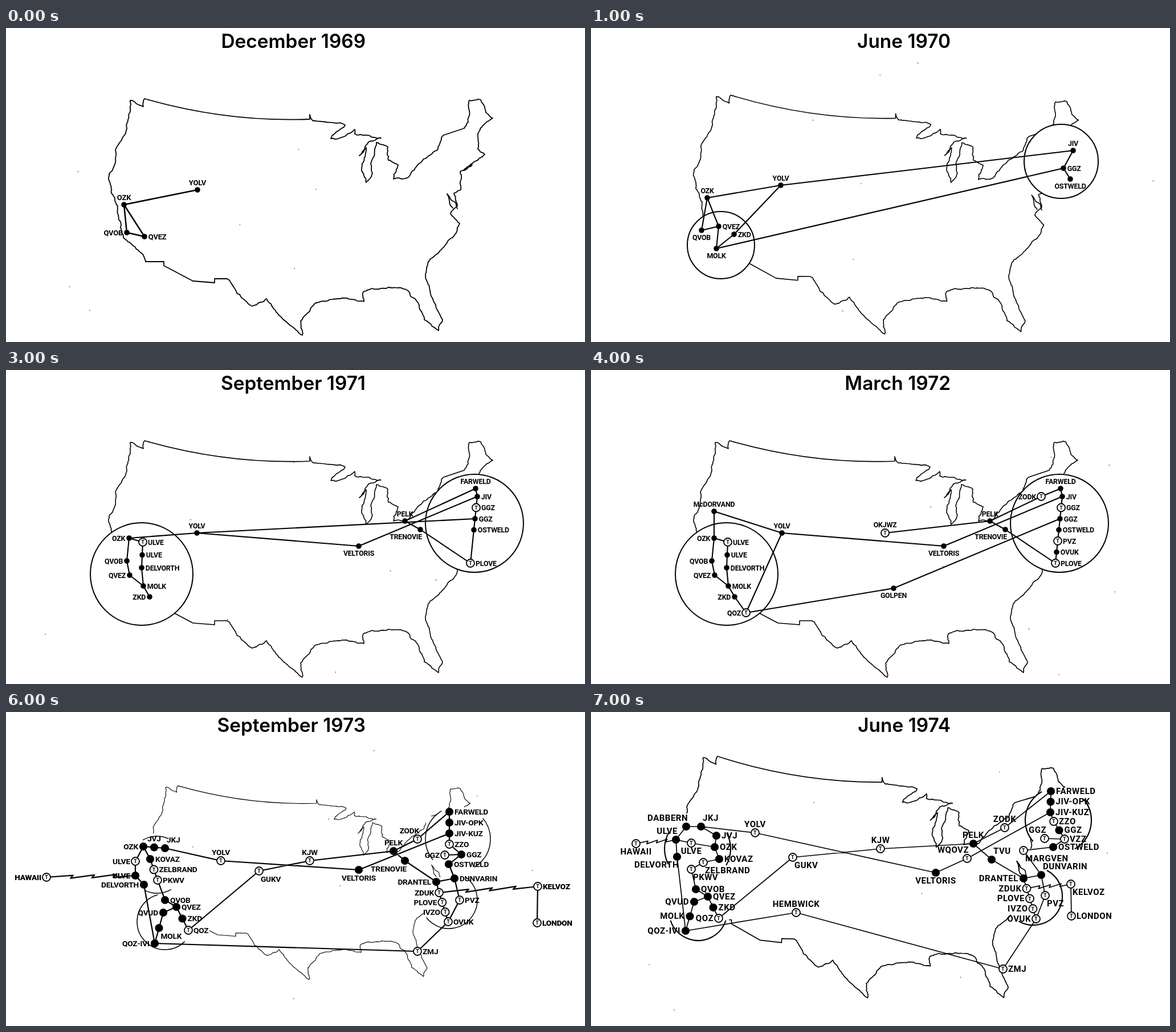
An HTML page for the animation above (8000 ms loop, 1016 by 551 pixels).

```html
<!DOCTYPE html>
<html lang="en">
<head>
<meta charset="utf-8">
<title>Network map</title>
<style>
  html, body { margin: 0; width: 100%; height: 100%; overflow: hidden; background: #fff; }
  svg { display: block; width: 1016px; height: 551px; }
  path, circle { fill: none; stroke: #000; stroke-linecap: round; stroke-linejoin: round; }
  .map path { vector-effect: non-scaling-stroke; }
  .hole { fill: #fff; stroke: none; }
  .dot { fill: #000; stroke: none; }
  .ring { fill: #fff; stroke-width: 1.8; }
  .arc { stroke-linecap: butt; }
  text { font-family: Roboto, Lato, sans-serif; }
  .title { font: 600 33.4px Inter, sans-serif; text-anchor: end; }
  .t { font: 700 9px Roboto, sans-serif; text-anchor: middle; }
</style>
</head>
<body>
<svg id="stage" viewBox="0 0 1016 551"></svg>
<script>
let seed = 7;
const random = () => (seed = seed * 16807 % 2147483647) / 2147483647;
const spread = amp => (random() * 2 - 1) * amp;

// Fractal shoreline: split each stretch at a displaced midpoint until it is short.
function wobble([x1, y1], [x2, y2]) {
  const len = Math.hypot(x2 - x1, y2 - y1);
  if (len < 5) return `L${x2.toFixed(1)} ${y2.toFixed(1)}`;
  const amp = Math.min(len * .13, 1.8);
  const mid = [(x1 + x2) / 2 + spread(amp), (y1 + y2) / 2 + spread(amp)];
  return wobble([x1, y1], mid) + wobble(mid, [x2, y2]);
}

function coast(text) {
  const pts = text.trim().split(/\s+/).map(p => p.split(',').map(Number));
  return 'M' + pts[0] + pts.slice(1).map((p, i) => wobble(pts[i], p)).join('');
}

const border = 'M243 124C330 149 430 164 533 160V152M245 410H277V417L328 444L366 447V440H388M804 176L768 188';
const west = coast(`243,124 241,138 231,134 218,127 216,150 210,184 192,214 189,244 180,262 185,290 196,312
  206,368 223,382 240,397 245,410`);
const gulf = coast(`388,440 413,473 432,488 457,475 485,510 520,539 517,514 546,482 592,474 628,480 627,463
  671,455 702,459 723,482 734,512 759,531 766,512 746,470 736,432 741,410`);
const atlantic = coast(`741,410 788,362 796,343 780,326 792,312 786,290 798,284 797,252 818,240 804,250 840,222
  828,212 828,190 836,172 854,158 842,148 833,126 813,127 811,165 804,176`);
const bay = coast('784,316 774,291 787,305 792,317');
const lakes = coast(`768,188 757,214 728,236 706,262 680,265 688,240 671,232 670,209 650,201 640,238 643,255
  632,271 624,250 632,210 620,224 636,200 658,193 612,186 612,178 586,193 570,194 595,170 539,163 533,152`);
const outline = border + west + gulf + atlantic + bay + lakes;

// Nodes: name, label side, x, y; "*" marks a terminal, "!" a heavy label.
// Nodes without a place are spaced evenly between their neighbours.
// Links: chains of node letters in listing order; "~" draws a jagged long-haul line.
// Circles: x, y, r, then start angle and length of a partial arc.
const late = { weight: 600, dot: 7.1, late: true };

const first = {
  title: 'December 1969', size: 13, pen: [1.8, 2.5],
  nodes: 'OZK n 207 310;YOLV n 336 284;QVOB w 212 359;QVEZ e 243 366',
  links: 'ba ac cd da'
};
const winter70 = {
  title: 'December 1970', map: 'translate(4 -10) rotate(.9)', circles: [[228, 381, 59], [825, 234, 65]],
  nodes: `OZK n 204 298;YOLV n 333 276;DELVORTH e 227 311;QVEZ e 224 348;QVOB s 194 355;ZKD e 251 362;
    MOLK s 220 387;PELK n 699 264;TRENOVIE s 707 292;FARWELD n 815 206;JIV n 846 215;GGZ e 829 246;OSTWELD s 841 265`,
  links: 'abkjhi im mlk lgfb ac cd dg ad ae ed'
};
const spring72 = {
  title: 'March 1972', circles: [[238, 358, 90], [822, 269, 86]],
  nodes: `McDORVAND n 216 248;YOLV n 335 286;OZK w 216 295;*ULVE e 240 302;ULVE e;DELVORTH e 238 347;
    QVOB w 212 335;QVEZ w 217 360;MOLK e 241 379;ZKD w 252 398;*QOZ w 272 426;*OKJWZ n 516 286;PELK n 700 265;
    TRENOVIE sw 727 280;VELTORIS s 619 309;GOLPEN s 531 383;*ZODK w 790 222;FARWELD n 824 208;
    JIV e 827 222;*GGZ e;GGZ e;OSTWELD e;*PVZ e;OVUK e;*PLOVE e 815 339`,
  links: 'cab cdefi cghijk bkpu bos lmqr mny rstuvwxy'
};
const summer72 = {
  title: 'August 1972', map: 'translate(-1 -22) rotate(1.7)', size: 11.6, pen: [1.3, 1.9],
  circles: [[216, 283, 65], [196, 399, 55], [845, 253, 60], [787, 369, 70]],
  nodes: `McDORVAND n 191 271;YOLV n 329 272;OZK n 168 291;*ULVE e 190 290;ULVE e;DELVORTH e 191 330;
    QVOB w 189 369;QVEZ w;ZKD s 188 412;*QOZ s 230 411;MOLK ne 227 390;*WEZO s 408 296;*OKJWZ n 518 282;
    GOLPEN n 506 373;VELTORIS s 625 301;PELK nw 700 264;TRENOVIE sw 728 282;*ZODK n 763 224;
    FARWELD e 820 213;JIV e;*GGZ e;GGZ e;OSTWELD e 821 293;*PVZ w 838 343;DRANTEL w 790 328;
    *ZUUK w 796 345;*PLOVE w;*IVZO w;*OVUK e 811 405`,
  links: 'cabot cdefk cghij hknC jlmprs pqyzABC stuvwxC'
};
const autumn73 = {
  ...late, title: 'September 1973', map: 'translate(98 27) scale(.84 .816) rotate(.35)', size: 13.7, pen: [1.1, 2.2],
  circles: [[265, 268, 50, 60, 54], [279, 368, 49, 45, 210], [793, 223, 57, 140, 100], [777, 330, 50, -55, 197]],
  holes: 'M180 213h177v217h-177zM737 183h130v175h-130z',
  nodes: `*!HAWAII w 71 290;*ULVE w 227 262;!ULVE w 227 287;DELVORTH w 242 303;OZK w 241 236;JVJ n;JKJ ne 279 239;
    KOVAZ e 253 258;*ZELBRAND e;*PKWV e 266 295;QVOB e 279 330;QVEZ e 299 342;ZKD e;*QOZ e 320 383;
    QVUD w 276 352;MOLK se;QOZ-IVI w 261 406;*YOLV n 377 261;*GUKV se 444 279;*KJW n 533 261;VELTORIS s 619 277;
    PELK n 680 244;TRENOVIE sw 700 261;*ZODK nw 722 223;FARWELD e 778 175;JIV-OPK e;JIV-KUZ e;*ZZO e 778 232;
    GGZ e 799 250;*GGZ w 770 251;OSTWELD e 777 267;DUNVARIN e 787 292;DRANTEL w 755 298;
    *ZDUK w 760 317;*PLOVE w;*IVZO w;*OVUK e 776 368;*PVZ e 796 330;*ZMJ e 722 420;
    *!KELVOZ e 933 306;*!LONDON e 932 370`,
  links: 'ebcdq efgruA ehijkl lmn lopq nstvxy vwGF GHIJK yzABCEFLK CD KMq NO ~ac ~HN'
};
const summer74 = {
  ...late, title: 'June 1974', map: 'translate(-17 -54) rotate(1.85)', size: 15, space: .5, pen: [1.7, 1.7],
  circles: [[187, 240, 58, 152, 58], [188, 350, 51, 18, 144], [820, 190, 58, 140, 100], [776, 323, 51, -62, 182]],
  holes: 'M120 178h122v190h-122zM755 240h80v85h-80z',
  nodes: `*HAWAII s 79 231;ULVE nw 149 224;*ULVE s 176 230;DELVORTH sw 151 254;DABBERN nw 167 201;JKJ ne 193 201;
    JVJ e 220 217;OZK e 217 237;KOVAZ e 225 258;*ZELBRAND se 197 264;*PKWV se 176 276;QVOB e 184 311;
    QVEZ e 205 324;ZKD e;*QOZ w 224 362;QVUD w 181 333;MOLK w;QOZ-IVI w 166 384;*YOLV n 288 212;*GUKV se 354 255;
    *HEMBWICK n 360 352;*KJW n 508 240;VELTORIS s 605 282;PELK n 671 231;*WQOVZ nw 660 257;TVU ne 703 259;
    *ZODK n 726 203;FARWELD e 807 139;JIV-OPK e;JIV-KUZ e 806 176;*ZZO e 812 192;GGZ e;*VZZ e 831 223;
    *GGZ nw 796 222;OSTWELD e 811 237;*MARGVEN se 759 243;DUNVARIN ne 790 286;
    DRANTEL w 759 292;*ZDUK w;*PLOVE w;*IVZO w;*OVUK w 781 363;*PVZ se 797 322;
    *KELVOZ se 842 302;*LONDON e 843 358;*ZMJ e 723 451`,
  links: '~ab bdr bef bch fghijklm fswyD mno mpqr otvxAB xzLK ruTP LMNOP BCDEFGIJK GH KQP ~MR RS'
};
// The in-between years reuse the next map with some nodes not yet connected.
const scenes = [
  first, { ...winter70, title: 'June 1970', omit: 'chij' }, winter70,
  { ...spring72, title: 'September 1971', omit: 'aklpqwx' }, spring72, summer72, autumn73, summer74
];

const ids = 'abcdefghijklmnopqrstuvwxyzABCDEFGHIJKLMNOPQRSTUVWXYZ';

function parseNodes(text) {
  const list = text.split(';').map(line => {
    const [tag, side, x, y] = line.trim().split(' ');
    return { name: tag.replace(/[*!]/g, ''), ring: tag.includes('*'), heavy: tag.includes('!'),
      side, x: +x, y: +y, placed: !!x };
  });
  list.forEach((n, i) => {
    if (n.placed) return;
    const a = list[i - 1], end = list.findIndex((m, j) => j > i && m.placed), steps = end - i + 1;
    n.x = a.x + (list[end].x - a.x) / steps;
    n.y = a.y + (list[end].y - a.y) / steps;
  });
  return list;
}

function jagged(a, b) {
  const dx = b.x - a.x, dy = b.y - a.y;
  let d = `M${a.x} ${a.y}`;
  for (let k = .3; k < .8; k += .24) {
    const x = a.x + dx * k, y = a.y + dy * k;
    d += `L${x} ${y - 2.5}L${x - dx * .03} ${y + 2.5}`;
  }
  return d + `L${b.x} ${b.y}`;
}

function drawLinks(links, nodes, omit) {
  return links.split(' ').map(chain => {
    const stops = [...chain].filter(c => c !== '~' && !omit.includes(c)).map(c => nodes[ids.indexOf(c)]);
    if (chain[0] === '~') return jagged(...stops);
    return stops.length > 1 ? 'M' + stops.map(n => `${n.x} ${n.y}`).join('L') : '';
  }).join('');
}

function drawNode({ name, ring, heavy, side, x, y }, dot) {
  const r = ring ? 7 : dot;
  const sx = side.includes('e') - side.includes('w'), sy = side.includes('s') - side.includes('n');
  const lx = x + (sy ? Math.abs(sx) * 3 : sx * (r + 2));
  const ly = y + (sy < 0 ? -r - 3 : sy > 0 ? r + 12 : 4.8);
  const mark = ring
    ? `<circle class="ring" cx="${x}" cy="${y}" r="${r}"/><text class="t" x="${x}" y="${y + 3.3}">T</text>`
    : `<circle class="dot" cx="${x}" cy="${y}" r="${r}"/>`;
  return `${mark}<text x="${lx}" y="${ly}" text-anchor="${['end', 'middle', 'start'][sx + 1]}"` +
    `${heavy ? ' font-weight="900"' : ''}>${name}</text>`;
}

// Short arcs appear again on the opposite side.
function drawCircle([x, y, r, start = 0, span = 360]) {
  const gap = (span < 120 ? 180 : 360) - span;
  return `<circle class="arc" cx="${x}" cy="${y}" r="${r}" pathLength="360" transform="rotate(${start} ${x} ${y})"` +
    `${gap ? ` stroke-dasharray="${span} ${gap}"` : ''}/>`;
}

const specks = () => Array.from({ length: 7 }, () => `M${random() * 1016} ${60 + random() * 480}h.1`).join('');

function drawScene({ title, map = '', size = 12.4, space = -.2, weight = 700, pen = [1.6, 2.1], dot = 4.8,
  circles = [], holes = '', nodes, links, omit = '', late }) {
  const list = parseNodes(nodes);
  const land = d => `<g class="map" transform="${map}"><path d="${d}" stroke-width="${pen[0]}"/></g>`;
  return `<g visibility="hidden">
    <text class="title" x="631" y="35">${title}</text>
    ${land(outline)}
    <path class="hole" d="${holes}"/>
    ${circles.map(([x, y, r]) => `<circle class="hole" cx="${x}" cy="${y}" r="${r}"/>`).join('')}
    ${late ? land(bay) : ''}
    <g stroke-width="${late ? pen[0] + .4 : 2}">${circles.map(drawCircle).join('')}</g>
    <path d="${specks()}" stroke-width="1.4"/>
    <path d="${drawLinks(links, list, omit)}" stroke-width="${pen[1]}"/>
    <g font-size="${size}" letter-spacing="${space}" font-weight="${weight}">
      ${list.filter((n, i) => !omit.includes(ids[i])).map(n => drawNode(n, dot)).join('')}</g>
  </g>`;
}

const stage = document.getElementById('stage');
stage.innerHTML = scenes.map(drawScene).join('');

function show() {
  const now = Math.floor(performance.now() / 1000) % scenes.length;
  [...stage.children].forEach((g, i) => g.setAttribute('visibility', i === now ? 'visible' : 'hidden'));
  requestAnimationFrame(show);
}
show();
</script>
</body>
</html>
```
